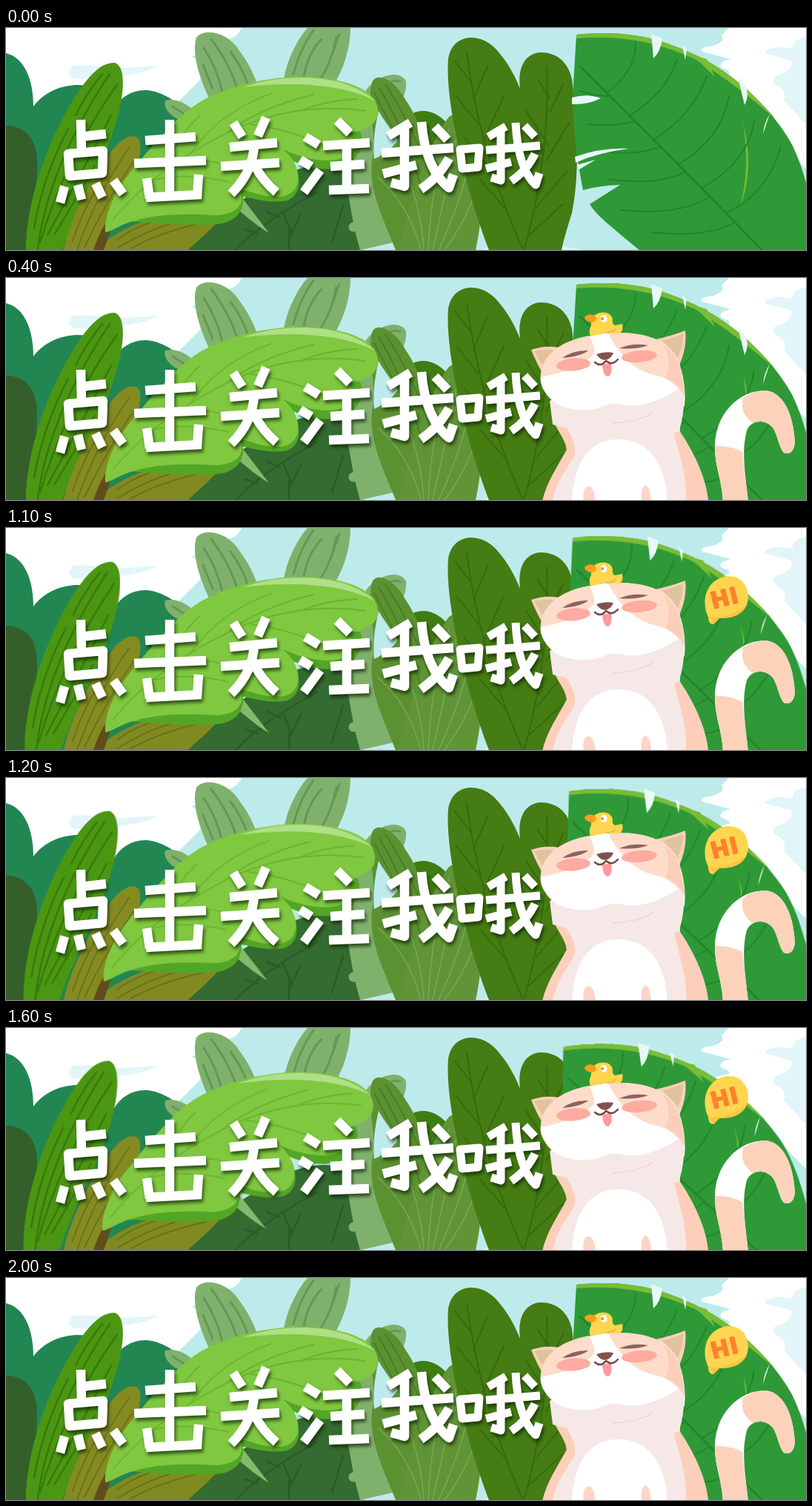
Recreate the animation shown at these times as an HTML page. Size 1080 by 300 pixels, loop 2.13 s.

```html
<!DOCTYPE html>
<html lang="zh">
<head>
<meta charset="utf-8">
<title>点击关注我哦</title>
<style>
html, body { margin: 0; width: 100%; height: 100%; overflow: hidden; background: #bdebec; }
svg { display: block; width: 100vw; height: 100vh; }
.line { fill: none; stroke-linecap: round; stroke-linejoin: round; }
.letters { fill: none; stroke: #fff; stroke-width: 12.5; stroke-linejoin: round; filter: drop-shadow(2px 4px 2px rgba(15, 35, 5, .7)); }
.hi { font: 900 30px Lato, Arial, sans-serif; letter-spacing: 3px; fill: #ff802f; stroke: #ff802f; stroke-width: 2; stroke-linejoin: round; }

.cat, .bubble, .blade, .fold, .fan { animation: 2130ms step-end infinite; }
.cat { animation-name: rise; }
.bubble { animation-name: pop; transform-origin: 953px 127px; }
.blade { --a: -1.6deg; animation-name: blade; transform-origin: 0 480px; }
.fold { --a: -1.4deg; animation-name: fold; transform-origin: 0 510px; }
.fan { --a: -2.9deg; animation-name: fan; transform-origin: 1090px 368px; }

@keyframes rise {
  0% { transform: translateY(300px); }
  4.69% { transform: translateY(169px); }
  9.38% { transform: translateY(75px); }
  14.08% { transform: translateY(19px); }
  18.77%, 100% { transform: none; }
}
@keyframes pop {
  0% { transform: scale(0); }
  28.16% { transform: scale(.55); }
  32.86%, 100% { transform: scale(1); }
}
@keyframes blade {
  0% { transform: rotate(0deg); }
  51.64% { transform: rotate(calc(var(--a) * .33)); }
  56.33% { transform: rotate(calc(var(--a) * .62)); }
  61.03% { transform: rotate(calc(var(--a) * .86)); }
  65.72% { transform: rotate(var(--a)); }
  70.42% { transform: rotate(calc(var(--a) * .88)); }
  75.11% { transform: rotate(calc(var(--a) * .66)); }
  79.81% { transform: rotate(calc(var(--a) * .44)); }
  84.5% { transform: rotate(calc(var(--a) * .22)); }
  89.2% { transform: rotate(calc(var(--a) * .08)); }
  93.89%, 100% { transform: rotate(0deg); }
}
@keyframes fold {
  0% { transform: rotate(0deg); }
  56.33% { transform: rotate(calc(var(--a) * .4)); }
  61.03% { transform: rotate(calc(var(--a) * .78)); }
  65.72% { transform: rotate(var(--a)); }
  70.42% { transform: rotate(calc(var(--a) * .86)); }
  75.11% { transform: rotate(calc(var(--a) * .65)); }
  79.81% { transform: rotate(calc(var(--a) * .42)); }
  84.5% { transform: rotate(calc(var(--a) * .2)); }
  89.2% { transform: rotate(calc(var(--a) * .06)); }
  93.89%, 100% { transform: rotate(0deg); }
}
@keyframes fan {
  0% { transform: rotate(0deg); }
  51.64% { transform: rotate(calc(var(--a) * .28)); }
  56.33% { transform: rotate(calc(var(--a) * .55)); }
  61.03% { transform: rotate(calc(var(--a) * .8)); }
  65.72% { transform: rotate(calc(var(--a) * .96)); }
  70.42% { transform: rotate(var(--a)); }
  75.11% { transform: rotate(var(--a)); }
  79.81% { transform: rotate(calc(var(--a) * .75)); }
  84.5% { transform: rotate(calc(var(--a) * .45)); }
  89.2% { transform: rotate(calc(var(--a) * .18)); }
  93.89%, 100% { transform: rotate(0deg); }
}
</style>
</head>
<body>
<svg viewBox="0 0 1080 300" preserveAspectRatio="none">
  <rect width="1080" height="300" fill="#bdebec"/>

  <!-- clouds -->
  <path fill="#fff" d="M0 0H318Q313 12 300 15Q304 25 288 31L250 38Q268 46 262 70L232 100L0 140Z"/>
  <path fill="#e2f5f8" d="M84 60Q90 56 88 51Q120 49 145 55L205 51Q190 60 160 64Q130 70 90 68Z"/>
  <path fill="#fff" d="M976 0H1080V190L1000 110Q930 92 928 74Q950 68 976 62Q980 58 966 54Q960 46 978 42L940 32Q935 26 955 24Q972 18 966 10Z"/>
  <path fill="#e2f5f8" d="M1080 12Q1060 16 1062 28Q1030 22 1024 34Q1046 40 1060 44Q1064 54 1048 62Q1030 66 1038 76Q1056 84 1050 98L1080 130ZM640 300L700 286L780 300Z"/>

  <!-- far bushes -->
  <path fill="#228653" d="M0 34C25 40 37 70 37 106C55 82 85 74 110 78L145 110C155 92 172 83 190 84C212 86 235 100 258 130V300H0Z"/>
  <path fill="#345f2b" d="M0 132C30 132 42 155 42 182C42 230 32 270 30 300H0Z"/>

  <!-- pale leaves -->
  <g fill="#80b16c">
    <path d="M276 99C262 70 250 35 257 13C268 -1 300 5 316 32C331 52 339 72 343 90Z"/>
    <path d="M262 132C230 128 211 112 215 98C232 93 254 106 264 126Z"/>
    <path d="M375 70C378 46 393 15 407 0H465C465 30 453 62 440 80Z"/>
    <path d="M486 84C500 64 532 55 540 72C542 92 528 108 518 122L480 120Z"/>
    <path d="M430 120L495 95L508 180L526 289L478 300L470 275L440 200Z"/>
  </g>
  <g class="line" stroke="#5f9a54" stroke-width="3">
    <path d="M267 27Q285 55 292 86M277 15Q303 50 312 82M303 32Q320 55 326 76M266 50L279 82"/>
    <path d="M388 62Q397 28 415 3M402 66Q407 35 426 15M425 68Q440 45 446 12M440 36L450 8"/>
    <path d="M505 78Q520 70 532 72M225 106L250 122"/>
  </g>

  <!-- centre bush -->
  <path fill="#346b30" d="M243 300C265 275 300 240 340 220C380 188 430 178 456 190Q472 240 478 300Z"/>
  <path class="line" stroke="#2a5b28" stroke-width="2.5" d="M310 300Q345 262 420 222M382 300V268M385 276L374 250M382 285L398 252M340 278L322 272M370 256L352 248M440 290L455 240"/>
  <path fill="#80b16c" d="M456 190Q485 190 500 205L525 289L478 300L470 270Z"/>
  <circle cx="469" cy="269" r="6.5" fill="#80b16c"/>

  <!-- leaves right of centre -->
  <path fill="#3f7d13" d="M545 118C560 106 585 112 600 135L580 180Z"/>
  <path fill="#5c9132" d="M526 300C505 250 490 215 494 180C502 140 486 105 494 74C500 58 525 70 540 98C562 130 578 180 590 300Z"/>
  <path fill="#bdebec" d="M503 112Q514 132 530 150Q520 166 497 177Q494 150 503 112Z"/>
  <path fill="#609436" d="M530 300C548 220 575 150 598 120C612 108 622 140 632 165C645 200 645 250 634 300Z"/>
  <g class="line" stroke="#487d24" stroke-width="1.8">
    <path d="M503 80Q535 130 562 220M512 76Q548 130 572 200M497 88Q530 150 548 190"/>
  </g>
  <g class="line" stroke="#7aa852" stroke-width="1.5">
    <path d="M560 300Q545 240 502 202M564 300Q560 230 530 176M570 300Q574 210 598 136M576 300Q594 220 610 140M584 300Q612 240 626 180M592 300Q622 260 636 214"/>
  </g>
  <path fill="#457c13" d="M652 300C626 235 592 105 597 42C602 8 638 5 660 27C680 48 690 72 694 82C690 50 703 34 722 33C750 33 764 55 765 78C772 140 774 200 764 250C756 275 752 290 750 300Z"/>
  <g class="line" stroke="#34690c" stroke-width="1.8">
    <path d="M622 34Q640 170 698 300M627 72L606 45M631 96L650 52M638 130L608 92M644 154L672 92M652 188L618 148M662 214L690 145M674 244L640 205"/>
    <path d="M730 52Q735 170 700 298M734 95L718 70M735 112L752 76M732 158L702 112M729 180L760 128M720 226L692 180M716 242L757 194M706 280L752 238"/>
  </g>

  <!-- left leaves -->
  <g class="blade">
    <path fill="#4b9712" d="M28 320C22 265 42 190 75 125C98 82 122 45 147 47C163 52 161 95 143 145C122 205 85 262 70 320Z"/>
    <path class="line" stroke="#38790c" stroke-width="2.5" d="M42 305Q55 190 140 62M46 290Q78 180 150 76M38 270Q50 200 84 136M56 280Q100 200 142 118M94 118Q110 86 130 62M66 278Q92 235 120 186"/>
  </g>
  <path fill="#858b20" d="M78 300C85 265 112 205 145 163C160 145 178 140 181 155C184 180 165 220 142 265L128 300Z"/>
  <path fill="#818a20" d="M122 300C145 275 190 250 306 236C285 268 255 290 246 300Z"/>
  <g class="line" stroke="#69731a" stroke-width="2">
    <path d="M96 300Q122 225 166 162M106 296Q135 235 172 180M90 288Q105 240 138 192"/>
    <path d="M150 298Q200 265 290 246M168 298Q210 275 270 262M150 286Q180 264 220 256"/>
  </g>
  <path fill="#604d1b" d="M118 300Q128 270 140 257L143 268L132 300Z"/>

  <!-- bright folded leaf -->
  <g class="fold">
    <path fill="#83ba6d" d="M316 226L355 277Q336 266 305 238Z"/>
    <path fill="#53a625" d="M300 150L478 140C486 158 474 186 445 190C425 193 400 186 388 180C400 205 398 225 380 233C355 238 335 230 320 228C322 245 312 262 286 265C235 268 190 262 170 262Z"/>
    <path fill="#7fc83f" d="M134 276C132 250 150 215 172 190C205 150 235 115 265 98C320 69 380 65 412 66C465 70 500 85 502 110C504 133 480 139 460 142C478 158 470 174 446 178C420 182 392 172 374 164C400 185 402 220 376 227C350 231 330 220 314 217C326 236 312 253 282 253C240 250 200 252 176 260C156 264 142 276 134 276Z"/>
    <path fill="#b0df86" d="M320 80C370 62 455 58 499 99C460 77 390 71 320 80Z"/>
    <path class="line" stroke="#69b431" stroke-width="1.8" d="M145 258Q210 180 320 132Q400 100 485 112M250 168Q290 112 360 88M292 146Q340 108 415 90M216 192Q228 150 262 118M200 205Q245 195 300 208M240 178Q300 176 364 212M330 130Q390 138 440 164M398 112Q430 98 474 96"/>
  </g>

  <!-- lettering -->
  <g class="letters" role="img" aria-label="点击关注我哦">
    <path d="M101 124L102 168M101 147L135 143M84 170L131 166L130 196L86 200ZM79 214L73 236M97 212L102 232M121 210L130 229M145 206L158 224"/>
    <path d="M221 124L221 227M188 152L256 147M173 183L270 179M190 203L194 230M260 198L258 228M189 229L264 225"/>
    <path d="M307 128L319 147M351 121L340 146M302 161L366 155M290 187L369 182M335 157Q334 194 304 224M336 186Q346 206 365 222"/>
    <path d="M404 147L422 158M397 178L412 187M424 192L402 222M447 125L464 142M428 159L491 155M438 187L484 184M436 219L490 217M460 156L460 218"/>
    <path d="M546 128L516 146M507 169L604 162M538 136V214L520 209M509 197L554 185M561 127Q566 190 598 216L604 198M598 176Q584 202 560 218M579 133L596 151"/>
    <path stroke-width="11" d="M613 164L639 162L637 188L616 190ZM675 133L651 147M648 165L721 159M668 140V206L655 202M648 190L682 181M688 128Q691 190 715 212L720 196M714 170Q704 192 682 207M700 132L714 147"/>
  </g>

  <!-- big torn leaf -->
  <g class="fan">
    <path fill="#2f9937" d="M770 9C840 2 885 14 938 40C992 68 1036 114 1058 152C1074 180 1092 235 1102 340H900C850 292 800 260 788 238L829 212Q800 213 779 219Q765 150 765 92Z"/>
    <path fill="#79bc35" d="M770 9C840 2 885 14 938 40C978 60 1014 93 1038 122C1005 94 970 66 930 42C880 19 830 9 770 14Z"/>
    <path fill="#79bc35" d="M926 36L957 66L946 42ZM995 128Q1011 190 991 242Q1005 190 995 128Z"/>
    <g class="line" stroke="#22852b" stroke-width="3">
      <path d="M775 52Q895 170 1030 310"/>
      <path stroke-width="2" d="M810 88Q850 60 850 20M842 118Q890 90 906 42M875 150Q926 120 946 65M908 184Q966 150 976 92M940 216Q1002 180 1010 126M972 250Q1028 225 1046 160"/>
      <path stroke-width="2" d="M815 92Q795 92 775 85M850 126Q820 134 785 130M884 160Q850 174 800 166M918 194Q880 214 812 204M950 228Q910 254 830 246M984 262Q950 284 870 276"/>
    </g>
    <path fill="#e7f8f8" d="M764 94Q785 88 803 95Q785 104 764 103ZM768 174Q805 161 841 163Q800 168 769 182ZM771 185L796 178L774 191ZM871 8L886 14Q884 32 874 41ZM913 23L919 28L917 43ZM988 66Q1008 84 997 104ZM1031 116L1022 143Q1023 130 1031 116ZM1044 124L1034 136Z"/>
  </g>

  <g class="bubble">
    <path fill="#ffd54f" d="M973 65C993 64 1002 78 1002 94C1001 112 988 122 963 122L955 130Q948 130 948 120C938 100 944 70 973 65Z"/>
    <path fill="#f8c640" d="M948 120Q972 124 1000 104Q992 122 963 122L955 130Z"/>
    <text class="hi" transform="translate(955 109) rotate(-14)">HI</text>
  </g>

  <!-- cat -->
  <g class="cat">
    <path fill="#fff" d="M968 302C966 270 957 256 957 228C957 185 988 152 1025 152C1050 154 1063 185 1065 222C1064 236 1056 239 1050 236C1043 228 1042 212 1035 202C1024 190 1006 192 1000 206C992 235 999 270 1002 302Z"/>
    <path fill="#fdd2bb" d="M957 227Q978 226 994 235Q998 270 1002 302H968C966 270 957 256 957 227ZM995 162Q1010 152 1025 152C1050 154 1063 185 1065 222C1064 236 1056 239 1050 236C1043 228 1042 212 1035 202Q1024 190 1008 196Q990 183 995 162Z"/>

    <path fill="#f6e8e7" d="M735 165C737 195 756 212 757 232C745 255 730 275 724 302H948C946 275 932 240 910 208L908 150Z"/>
    <path fill="#fdcfba" d="M737 182C738 202 755 214 757 232C745 255 730 275 724 302H738C742 275 760 255 768 238C770 215 752 195 737 182ZM916 160C915 180 905 195 908 206C932 240 946 275 948 302H918C920 262 905 230 900 200Z"/>
    <path fill="#fff" d="M764 302C766 250 788 218 826 218C868 218 890 250 893 302Z"/>
    <path fill="#fbd5c8" d="M780 302C777 286 784 278 790 283Q795 288 796 302ZM858 302Q856 284 863 280Q870 282 871 302Z"/>

    <path fill="#fbd0ba" d="M709 97Q735 88 760 98L728 135Q716 115 709 97Z"/>
    <path fill="#dfc39d" d="M713 99Q735 93 748 101L728 124Z"/>
    <path fill="#fbd0ba" d="M872 84Q900 78 917 71Q920 95 907 122Z"/>
    <path fill="#dfc39d" d="M886 85L914 76Q914 96 905 110Q898 94 886 85Z"/>
    <path fill="#fff" d="M722 142C718 112 745 86 800 76C850 69 892 82 906 108C915 130 918 152 916 172C908 192 870 200 830 184C800 192 735 185 722 142Z"/>
    <path fill="#f6e8e7" d="M734 166Q765 184 800 176Q820 166 836 172Q870 176 914 146Q918 180 908 208Q840 225 738 198Z"/>
    <path fill="#fedcca" d="M722 134C722 105 748 85 787 78Q795 92 794 102Q775 124 722 134ZM813 75C860 70 895 85 906 108C914 128 916 142 916 160Q900 136 878 132Q838 124 813 75Z"/>
    <path fill="#fcceb9" d="M888 91C905 100 914 128 916 160Q908 142 890 135Q900 116 888 91Z"/>
    <ellipse cx="766" cy="117" rx="23" ry="8.5" fill="#ffaba1" transform="rotate(-5 766 117)"/>
    <ellipse cx="855" cy="106" rx="24" ry="8" fill="#ffaba1" transform="rotate(-5 855 106)"/>
    <path fill="#8f6262" d="M751 108Q766 97 786 98Q776 106 751 108ZM828 95Q846 87 867 91Q850 97 828 95Z"/>
    <path fill="#fe9a9d" d="M805 117Q806 133 813 133Q819 130 817 115Z"/>
    <path fill="#84504e" d="M797 103Q808 99 820 101Q817 109 809 111Q801 110 797 103Z"/>
    <path class="line" stroke="#76484a" stroke-width="2.5" d="M795 114Q803 121 810 112Q818 119 826 110"/>
    <path class="line" stroke="#efd8d8" stroke-width="2" d="M820 196Q855 194 873 182"/>

    <!-- duckling -->
    <path fill="#ffd64e" d="M790 58C792 44 817 42 819 56Q818 62 822 64L832 62Q834 72 828 75Q805 73 789 79Q786 70 790 64Z"/>
    <path fill="#f5bd3c" d="M803 72Q815 76 824 67Q823 76 812 74Z"/>
    <path fill="#ff9d1f" d="M781 53Q788 46 796 52Q799 58 792 60Q781 59 781 53Z"/>
    <ellipse cx="807" cy="55" rx="4.5" ry="5" fill="#fff"/>
    <circle cx="805" cy="55" r="2" fill="#f08a25"/>
  </g>
</svg>
</body>
</html>
```
